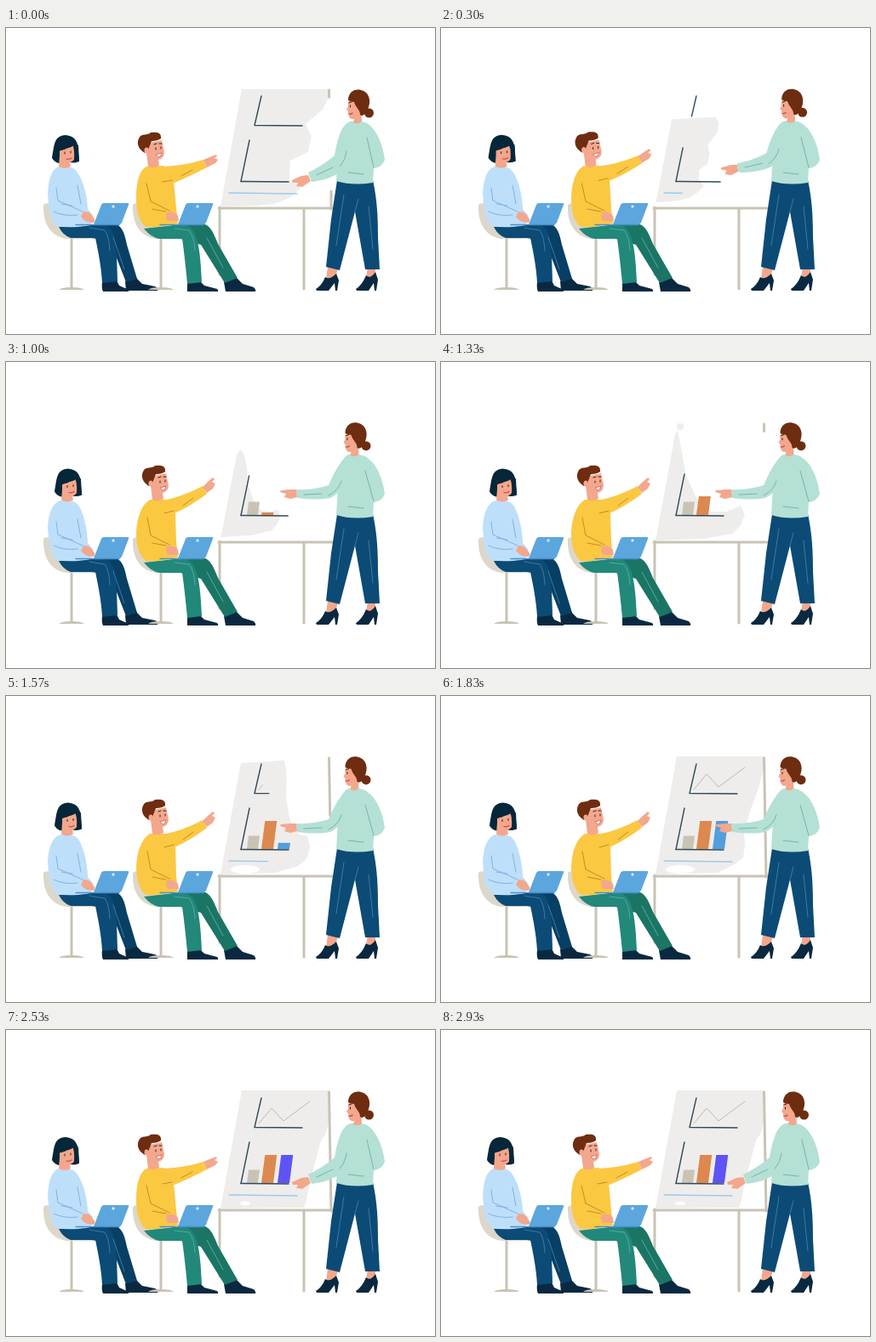
These frames come from a looping animation (504 by 360 pixels, 2960 ms). An HTML page:

```html
<!DOCTYPE html>
<html lang="en">
<head>
<meta charset="utf-8">
<title>Presentation</title>
<style>
html, body { margin: 0; width: 100%; height: 100%; overflow: hidden; background: #fff; }
svg { display: block; width: 504px; height: 360px; }
.line { fill: none; stroke-linecap: round; stroke-linejoin: round; }
.skin { fill: #f3a78d; }
.shoe { fill: #0a2940; }
.hair { fill: #6e2d10; }
.wood { stroke: #c9c3b4; stroke-width: 3; }
.ink { stroke: #304a5b; stroke-width: 1.4; }
.face { stroke: #34201c; stroke-width: 1; }
.lip { stroke: #c8474a; stroke-width: 1.2; }
.chair { fill: #dcd7ca; }
.laptop { fill: #5ca6de; }
</style>
</head>
<body>
<svg viewBox="0 0 504 360">
  <defs>
    <g id="stool">
      <path class="chair" d="M44 208C49 204 54 207 57 215L66 232L104 236L105 247Q97 249 72 248C54 246 43 232 44 208Z"/>
      <path class="line wood" d="M77 249V305" stroke-width="2.5"/>
      <path d="M62 308Q65 305 77 305Q89 305 92 308Z" fill="#c9c3b4"/>
    </g>
    <g id="laptop">
      <path class="laptop" d="M103 231L112 208Q113 206 115 206H143Q145 206 144 208L136 229Q135 231 133 231Z"/>
      <path class="line" d="M82 231.5H133" stroke="#4a8fc8" stroke-width="1.5"/>
      <circle cx="126" cy="210" r="1.7" fill="#cfe6fa"/>
    </g>
  </defs>

  <!-- easel and charts -->
  <polygon id="board" fill="#eeedeb"/>
  <circle id="scrap" cx="281" cy="76" r="4" fill="#eeedeb"/>
  <ellipse id="scoop" cy="204" fill="#fff"/>
  <path id="post" class="line wood" pathLength="1" stroke-dasharray="1 2" d="M379.500 73L382 213"/>
  <path id="stub" class="line wood" d="M382 192V213"/>
  <path class="line wood" d="M251 211V290M350 212V307"/>
  <path class="line wood" d="M250 212H383"/>
  <path id="top" class="line ink" pathLength="1" d="M300 80L292 114.500L348 115"/>
  <path id="trend" class="line" pathLength="1" d="M297 110L312 92L326 107L357 84" stroke="#b9b9b8"/>
  <path id="rule" class="line" pathLength="1" d="M262 194L342 195" stroke="#9ccbea" stroke-width="1.3"/>
  <polygon id="bar0" fill="#c8c3b5"/>
  <polygon id="bar1" fill="#dc884e"/>
  <polygon id="bar2"/>
  <path id="rise" class="line ink" pathLength="1" d="M276 180.500L286 132"/>
  <path id="run" class="line ink" pathLength="1" d="M276 180.500L332 181"/>

  <!-- listener on the left -->
  <use href="#stool"/>
  <path class="shoe" d="M113 299L130 297L133 303L144 308V310H114Q112 306 113 299ZM140 298L153 294L160 301L175 304Q179 306 178 309H141Z"/>
  <path fill="#083f64" d="M95 232L124 230C135 230 139 239 142 255L154 295L141 299L122 250L100 247Z"/>
  <path fill="#0b4b76" d="M62 234L116 232C128 234 130 250 131 298L113 300C112 280 108 262 105 247L76 247Q67 244 62 234Z"/>
  <path class="line" stroke="#3b7ba2" d="M98 235L116 238Q121 244 122 262M126 246L139 284"/>
  <path fill="#bedffa" d="M62 163C53 166 50 178 49 195L50 207C52 222 55 229 60 233Q75 236 100 232L102 220L96 213C96 200 91 180 84 170C80 164 75 162 62 163Z"
    data-b="M64 163C54 166 50 178 49 195L50 207C52 222 55 229 60 233Q75 236 100 232L102 220L96 213C96 200 92 180 86 170C82 164 77 162 64 163Z"/>
  <path class="line" stroke="#80b3df" d="M59 188L61 203L90 216M65 207L78 209M84 185L88 207M56 216Q68 222 84 220"/>
  <path class="skin" d="M91 216Q98 215 102 222Q106 226 103 229L95 228Q91 226 88 222Z"/>
  <use href="#laptop"/>
  <g data-shift="3 -.5">
    <path fill="#06273a" d="M54 153C57 137 56 127 70 126C82 127 85 135 85 146L86 157Q78 160 74 157L62 159Q57 158 54 153Z"/>
    <path class="skin" d="M63 150L62 163Q69 167 76 163L75 158C83 156 83 146 80 138Q73 143 63 142Z"/>
    <path fill="#06273a" d="M59 145Q68 145 77 136Q81 140 80 155L86 157L85 138L75 128L60 133Z"/>
    <path class="line face" d="M69 146V148M76 145V147M67 143L70 142"/>
    <path class="line lip" d="M71 154Q74 155 77 153"/>
  </g>

  <!-- listener pointing -->
  <use href="#stool" x="105"/>
  <path class="shoe" d="M213 300L228 298L233 303L248 307Q250 309 249 310H213ZM256 299L270 293L278 301L291 305Q294 308 293 310H258Z"/>
  <path fill="#1b7565" d="M195 232L229 230C239 230 243 239 249 254L272 294L257 300L229 255L205 248Z"/>
  <path fill="#21887a" d="M162 236L206 231C222 232 228 246 230 299L213 301C211 280 209 262 207 248L180 248Q170 246 162 236Z"/>
  <path class="line" stroke="#56aa9d" d="M198 236L215 238Q221 245 222 262M236 247L255 282"/>
  <path fill="#fbc842" d="M165 163C156 168 153 183 153 200C153 217 157 228 164 234Q181 235 202 230L200 212L197 180L185 162Z"
    data-b="M169 162C159 168 154 183 153 200C153 217 157 228 164 234Q181 235 202 230L200 212L199 178L191 162Z"/>
  <path fill="#fbc842" d="M180 163Q205 163 232 155L236 164Q215 175 198 182Q185 185 178 178Z"
    data-b="M184 163Q206 159 231 146L236 155Q216 170 200 177Q188 182 182 177Z"/>
  <path class="line" stroke="#c58d23" d="M195 179L184 181M165 183L170 204L192 215M172 213L188 216M206 174L219 167"
    data-b="M197 175L186 178M166 183L170 204L192 215M172 213L188 216M208 169L220 160"/>
  <path class="skin" d="M232 155L239 152L247 149L248 151L245 153L249 155L246 159L236 164Z"
    data-b="M231 147L237 141L243 136L245 138L242 141L246 143L243 149L236 154Z"/>
  <path class="skin" d="M189 217Q198 215 202 221L203 227L190 227Q187 222 189 217Z"/>
  <use href="#laptop" x="99"/>
  <g data-shift="5 -1">
    <path class="skin" d="M165 147L167 163Q174 166 180 162L179 155Q186 153 186 146L183 132L164 136Z"/>
    <path class="hair" d="M163 147C156 143 153 136 156 130C159 123 166 127 170 123C177 122 183 123 182 130Q178 133 171 133Q169 138 167 143Z"/>
    <ellipse class="skin" cx="165" cy="144" rx="2.500" ry="3.500"/>
    <path class="line face" d="M176 141V143M182 140V142M174 137L177 136M180 136L183 136"/>
    <path d="M176 149L183 147Q182 152 179 152Z" fill="#fff" stroke="#c8474a" stroke-width=".7"/>
  </g>

  <!-- presenter -->
  <path class="skin" d="M378 281L390 283L387 293L376 295ZM425 281L434 282L434 291L423 294Z"/>
  <path class="shoe" d="M364 307Q371 303 375 293Q380 297 388 289L391 297L389 309H387L386 300L379 309H365ZM411 307Q418 303 423 291Q428 296 434 287L437 296L435 309H433L432 300L426 309H412Z"/>
  <path fill="#0b4b76" d="M389 179H431C436 202 437 222 437 246L439 284L422 284L410 216L392 285L376 281L382 225Z"/>
  <path class="line" stroke="#3b7ba2" d="M397 196L388 256M410 216L414 201M426 210L431 260"/>
  <path fill="#b5e0d5" d="M404 110Q394 115 391 130L388 180Q407 186 431 182L432 165Q442 164 445 155C443 139 437 123 428 115Q421 108 404 110Z"
    data-b="M402 109Q393 114 391 130L388 180Q407 186 431 182L432 165Q442 164 445 155C443 139 436 121 426 114Q419 107 402 109Z"/>
  <path fill="#b5e0d5" d="M402 111Q391 118 386 150Q372 162 355 170L359 181Q381 179 394 168Q404 154 407 130Z"
    data-b="M400 110Q389 121 379 145Q361 151 341 150L342 160Q365 163 381 160Q399 150 405 130Z"/>
  <path class="line" stroke="#77b5a9" d="M424 129L432 164M392 163Q399 155 400 145M402 170L420 172M365 173L384 164"
    data-b="M422 128L432 164M379 157Q391 151 394 140M402 170L420 172M350 156L371 155"/>
  <path class="skin" d="M355 173L347 174L336 179L337 182L343 182L341 186L348 187L358 180Z"
    data-b="M341 150L334 150L323 151L322 153L329 155L327 159L334 161L342 159Z"/>
  <g data-shift="-3.500 -1.300">
    <path class="skin" d="M404 82Q401 89 402 92L400 96L402 98C402 104 404 108 409 107L408 111Q413 114 418 110L417 94Z"/>
    <circle class="hair" cx="426.500" cy="100" r="5.500"/>
    <path class="hair" d="M402 85C402 76 409 71 417 73C426 75 429 84 426 93C424 100 419 105 416 102C416 96 411 94 409 87Q405 87 402 85Z"/>
    <path class="line face" d="M404.500 91V93M403 88L406 87"/>
    <path class="line lip" d="M403 101Q405 102 407 100"/>
  </g>
</svg>
<script>
const LOOP = 2960;
const $ = id => document.getElementById(id);
const clamp = x => Math.max(0, Math.min(1, x));
const ramp = (t, a, b) => clamp((t - a) / (b - a));
const smooth = x => x * x * (3 - 2 * x);
const lerp = (a, b, p) => a + (b - a) * p;
const nums = s => s.match(/-?[\d.]+/g).map(Number);

function mix(a, b, p) {
  const to = nums(b);
  let i = 0;
  return a.replace(/-?[\d.]+/g, n => lerp(+n, to[i++], p).toFixed(2));
}

const boards = [
  [0, "277,72 378,72 379,82 372,96 352,113 359,127 355,146 334,156 333,178 347,188 333,200 315,207 296,209 252,210"],
  [560, "266,138 275,133 281,136 283,148 280,158 278,166 277,172 277,176 277,180 276,184 274,188 272,193 265,198 253,201"],
  [1330, "275,86 277,80 280,92 284,112 287,132 300,160 316,176 335,176 352,169 357,180 352,192 342,202 308,208 252,210"],
  [1830, "277,71 380,71 381,76 379,85 374,105 368,122 362,138 359,150 356,160 357,176 355,190 345,198 325,208 252,210"],
  [2230, "277,71 380,71 381,76 380,95 379,110 375,123 370,130 366,145 362,160 358,175 355,188 353,200 350,209 252,210"],
  [LOOP, "277,71 380,71 381,76 380,95 379,110 375,123 370,130 366,145 362,160 358,175 355,188 353,200 350,209 252,210"]
];

const morphs = [...document.querySelectorAll("[data-b]")].map(el => [el, el.getAttribute("d"), el.dataset.b]);
const shifts = [...document.querySelectorAll("[data-shift]")].map(el => [el, nums(el.dataset.shift)]);

function draw(id, part) {
  $(id).style.strokeDasharray = part + " 2";
  $(id).style.visibility = part > 0 ? "visible" : "hidden";
}

// Slanted bar standing on the lower axis.
function bar(i, x, width, height, part) {
  const h = height * part, lean = h * .13;
  $("bar" + i).setAttribute("points",
    `${x},180 ${x + lean},${180 - h} ${x + lean + width},${180 - h} ${x + width},180`);
}

function frame(now) {
  const t = now % LOOP;
  const pose = smooth(ramp(t, 20, 560)) * (1 - smooth(ramp(t, 1830, 2530)));
  for (const [el, a, b] of morphs) el.setAttribute("d", mix(a, b, pose));
  for (const [el, [x, y]] of shifts) el.setAttribute("transform", `translate(${x * pose} ${y * pose})`);

  const k = boards.findIndex(b => b[0] > t) - 1;
  const [[t0, from], [t1, to]] = boards.slice(k, k + 2);
  $("board").setAttribute("points", mix(from, to, ramp(t, t0, t1)));
  $("scrap").style.visibility = t > 1250 && t < 1500 ? "visible" : "hidden";
  $("stub").style.visibility = t < 200 ? "visible" : "hidden";

  const shrink = ramp(t, 1830, 2500);
  $("scoop").setAttribute("cx", 281);
  $("scoop").setAttribute("rx", t < 1500 ? 0 : lerp(17, 6, shrink));
  $("scoop").setAttribute("ry", lerp(5, 2.5, shrink));

  draw("post", lerp(.06, 1, ramp(t, 1400, 1780)) * (t < 150 || t > 1280));
  draw("top", 1 - ramp(t, 30, 400) + ramp(t, 1400, 1700));
  draw("trend", ramp(t, 1550, 1800));
  draw("rule", 1 - ramp(t, 30, 400) + ramp(t, 1400, 1700));
  const axis = 1 - ramp(t, 30, 500) + ramp(t, 630, 1050);
  draw("rise", lerp(.68, 1, axis));
  draw("run", lerp(.88, 1, axis));

  bar(0, 283, 13, 15.5, ramp(t, 480, 930));
  bar(1, 300, 14, 33, ramp(t, 950, 1520));
  bar(2, 319, 14, 33, ramp(t, 1500, 1820));
  const tint = ramp(t, 1830, 2150);
  $("bar2").setAttribute("fill", `rgb(${lerp(82, 94, tint)},${lerp(158, 84, tint)},${lerp(222, 246, tint)})`);
  requestAnimationFrame(frame);
}

const start = performance.now();
const tick = frame;
tick(0);
</script>
</body>
</html>
```
